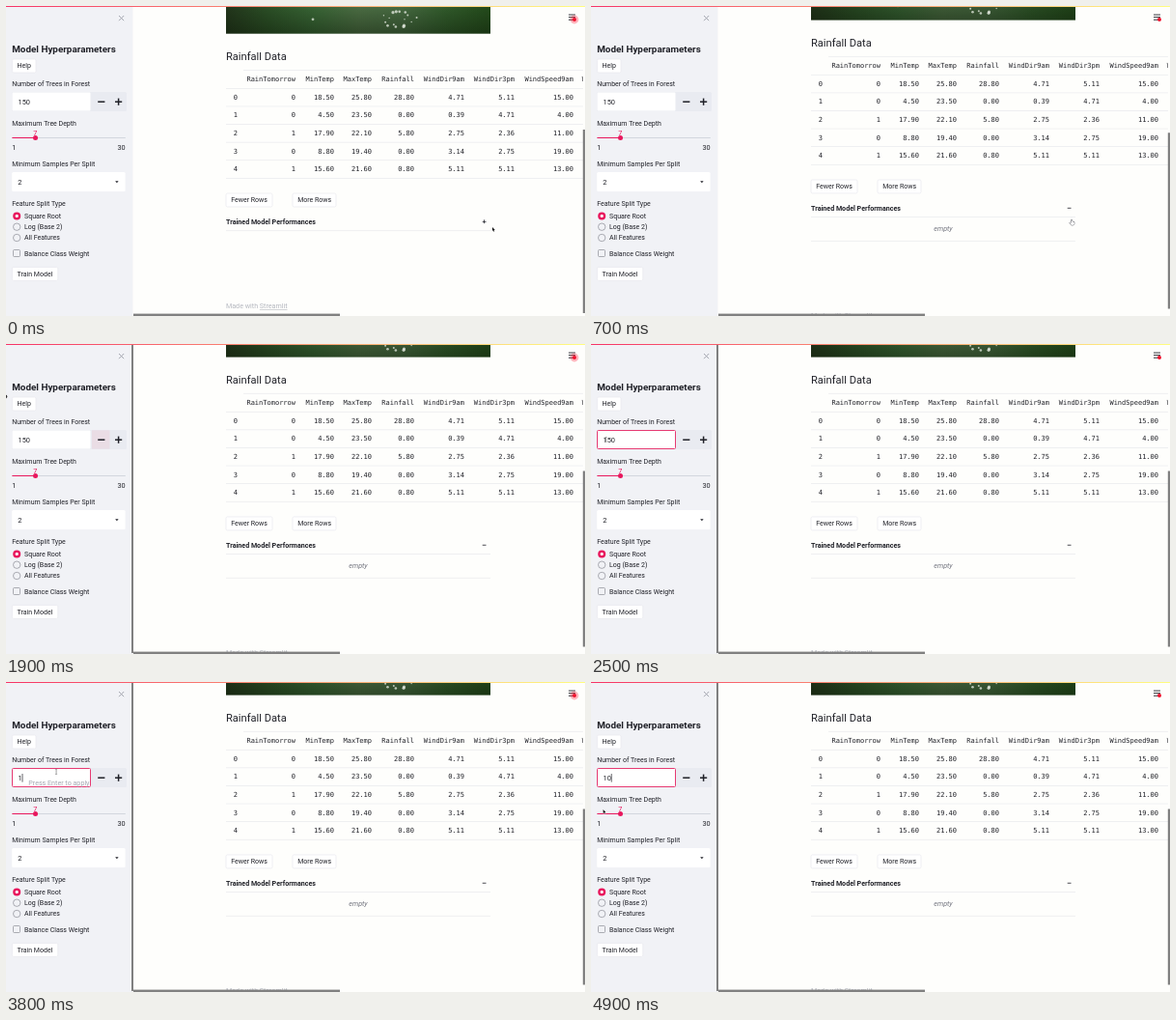
Recreate the animation shown at these times as an HTML page with a canvas. Size 600 by 321 pixels, loop 5 s.

```html
<!DOCTYPE html>
<html lang="en">
<head>
<meta charset="utf-8">
<title>Model dashboard</title>
<style>
html, body { margin: 0; width: 100%; height: 100%; overflow: hidden; background: #fff; }
canvas { display: block; width: 600px; height: 321px; }
</style>
</head>
<body>
<canvas id="stage"></canvas>
<script>
const W = 600, H = 321, LOOP = 5000, STEP = 100;
const SANS = 'Roboto, "Open Sans", sans-serif';
const MONO = '"DejaVu Sans Mono", "Liberation Mono", monospace';
const INK = '#202128', PINK = '#e8175d', SIDE = '#f1f2f6', RULE = '#e9eaed', BAR = '#808080';

const canvas = document.getElementById('stage');
const ctx = canvas.getContext('2d');
const ratio = window.devicePixelRatio || 1;
canvas.width = W * ratio;
canvas.height = H * ratio;

const clamp = v => Math.max(0, Math.min(1, v));
const lerp = (a, b, p) => a + (b - a) * p;
const ease = (t, from, to) => {
  const p = clamp((t - from) / (to - from));
  return p * p * (3 - 2 * p);
};

// y is the middle of the capital letters
function text(s, x, y, { size = 7, color = INK, align = 'left', font = SANS, style = '' } = {}) {
  ctx.font = `${style} ${size}px ${font}`;
  ctx.textAlign = align;
  ctx.fillStyle = color;
  ctx.fillText(s, x, y + size * 0.355);
}

function rect(x, y, w, h, color) {
  ctx.fillStyle = color;
  ctx.fillRect(x, y, w, h);
}

function box(x, y, w, h, fill, stroke, r = 1.5, line = 0.7) {
  ctx.beginPath();
  ctx.roundRect(x, y, w, h, r);
  if (fill) { ctx.fillStyle = fill; ctx.fill(); }
  if (stroke) { ctx.strokeStyle = stroke; ctx.lineWidth = line; ctx.stroke(); }
}

function disc(x, y, r, fill, stroke, line = 0.7) {
  ctx.beginPath();
  ctx.arc(x, y, r, 0, Math.PI * 2);
  if (fill) { ctx.fillStyle = fill; ctx.fill(); }
  if (stroke) { ctx.strokeStyle = stroke; ctx.lineWidth = line; ctx.stroke(); }
}

function poly(points, fill, stroke, line = 0.6) {
  ctx.beginPath();
  points.forEach(([x, y]) => ctx.lineTo(x, y));
  ctx.closePath();
  if (stroke) { ctx.strokeStyle = stroke; ctx.lineWidth = line; ctx.stroke(); }
  ctx.fillStyle = fill;
  ctx.fill();
}

function sign(x, y, arm, line, plus, color = INK) {
  rect(x - arm, y - line / 2, arm * 2, line, color);
  if (plus) rect(x - line / 2, y - arm, line, arm * 2, color);
}

function button(label, x, y, w) {
  box(x, y - 7, w, 14, '#fff', '#e8e9ee');
  text(label, x + 5.2, y);
}

function clip(x, y, w, h) {
  ctx.save();
  ctx.beginPath();
  ctx.rect(x, y, w, h);
  ctx.clip();
}

function drawPhoto(bottom) {
  clip(228, 0, 274, bottom);
  const g = ctx.createLinearGradient(228, 0, 502, 0);
  ['#22351b', '#2b4f26', '#376334', '#4a6b42', '#456840', '#30592a', '#234a1b']
    .forEach((c, i) => g.addColorStop(i / 6, c));
  rect(228, 0, 274, bottom, g);
  const shade = ctx.createLinearGradient(0, bottom - 28, 0, bottom);
  shade.addColorStop(0, 'rgba(10,20,5,0)');
  shade.addColorStop(1, 'rgba(10,20,5,.4)');
  rect(228, 0, 274, bottom, shade);
  // droplets hang together in a loose arc
  for (let i = 0; i < 16; i++) {
    const a = i * 2.4, x = 407 + Math.cos(a) * (6 + i), y = bottom - 15 + Math.sin(a) * 8;
    disc(x, y, 0.7 + (i % 4) * 0.3, 'rgba(232,238,228,.75)');
  }
  disc(318, bottom - 15, 1.4, 'rgba(232,238,228,.7)');
  ctx.restore();
}

const COLS = [
  ['RainTomorrow', 300, '0 0 1 0 1'],
  ['MinTemp', 340, '18.50 4.50 17.90 8.80 15.60'],
  ['MaxTemp', 379, '25.80 23.50 22.10 19.40 21.60'],
  ['Rainfall', 423, '28.80 0.00 5.80 0.00 0.80'],
  ['WindDir9am', 475, '4.71 0.39 2.75 3.14 5.11'],
  ['WindDir3pm', 527, '5.11 4.71 2.36 2.75 5.11'],
  ['WindSpeed9am', 588, '15.00 4.00 11.00 19.00 13.00']
];

function drawTable(dy) {
  const right = { font: MONO, align: 'right' };
  const rowY = i => 94.4 + i * 18.6 + dy;
  clip(228, 0, 370, H);
  rect(246, 66 + dy, 352, 0.7, RULE);
  for (let i = 0; i <= 5; i++) rect(228, rowY(i) - 9.4, 370, 0.7, RULE);
  for (let i = 0; i < 5; i++) text(String(i), 240, rowY(i), right);
  for (const [name, x, values] of COLS) {
    text(name, x, 75.7 + dy, right);
    values.split(' ').forEach((v, i) => text(v, x, rowY(i), right));
  }
  text('W', 596.8, 75.7 + dy, { font: MONO });
  ctx.restore();
}

function drawMain(t) {
  const scroll = ease(t, 305, 775);
  const dy = -15.1 * scroll;
  const open = ease(t, 250, 700);
  const hover = t >= 200 && t < 650;
  const tone = hover ? PINK : INK;
  const y = 223.6 + dy;

  drawPhoto(28.8 + dy);
  text('Rainfall Data', 228, 52.5 + dy, { size: 11.1 });
  drawTable(dy);
  button('Fewer Rows', 228, 201 + dy, 48);
  button('More Rows', 297, 201 + dy, 45);

  text('Trained Model Performances', 228, y, { style: hover ? '500' : 'bold', size: 7.1, color: tone });
  sign(495.6, y - 0.3, 1.9, 0.8, open < 0.2, tone);
  rect(228, y + 8.8, 274, 0.7, hover ? PINK : RULE);
  if (open > 0.1) {
    text('empty', 365, y + 8.5 + 12.6 * open,
      { style: 'italic', size: 7.2, align: 'center', color: hover ? INK : '#747680' });
    if (open > 0.8) rect(228, y + 33.4 * open, 274, 0.7, RULE);
  }

  const footY = 310.6 + dy + 24 * open;
  const pale = { color: '#b4b7bf', size: 7.15 };
  text('Made with ', 228, footY, pale);
  const linkX = 228 + ctx.measureText('Made with ').width;
  text('Streamlit', linkX, footY, pale);
  rect(linkX, footY + 3.4, ctx.measureText('Streamlit').width, 0.6, pale.color);

  rect(132, 318.6, 214, 2.4, BAR);
  const top = lerp(128, 131.5, scroll);
  rect(597.8, top, 2.2, lerp(318, 313.5, open) - top, BAR);
}

function drawMenu(t) {
  for (let i = 0; i < 3; i++) rect(583, 8.6 + i * 2.6, 7, 0.9, INK);
  const glow = Math.max(0, Math.cos(t / 950 * Math.PI * 2)) ** 3;
  disc(589, 14, 2 + 2.4 * glow, `rgba(255,43,70,${0.35 * glow})`);
  disc(589, 14, 2, '#f0142f');
}

function drawInput(t) {
  const focus = t >= 2500;
  const key = t >= 4400 ? 4400 : t >= 4100 ? 4100 : 3500;
  const value = t >= 4100 ? '10' : t >= 3500 ? '1' : '150';

  box(6, 89, 119, 20, '#e9ebf1', null);
  if (t >= 1700 && t < 2100) rect(89, 89.3, 18.5, 19.4, '#eadde5');
  box(6.5, 89.5, 81, 19, '#fff', focus ? '#e63a72' : null, 1, 1);
  if (t >= 2700 && t < 3500) rect(12.3, 94.3, 13.2, 9.4, '#c3c3c6');
  text(value, 12.5, 99.4, { size: 7.4 });
  if (t >= 3500) {
    const end = 12.5 + ctx.measureText(value).width;
    if ((t - key) % 1000 < 530) rect(end, 95, 0.7, 8.6, INK);
    if (t < 4400) text('Press Enter to apply', 86.5, 104.6, { size: 7.15, color: '#a5a8b2', align: 'right' });
  }
  sign(98.8, 99.2, 3.6, 1.5, false);
  sign(116.6, 99.2, 3.6, 1.5, true);
}

function drawSidebar(t) {
  rect(0, 0, 131.5, H, SIDE);
  if (t >= 1600) rect(130, 0, 2, 320, BAR);

  ctx.beginPath();
  ctx.moveTo(117, 10); ctx.lineTo(122.2, 15.2);
  ctx.moveTo(122.2, 10); ctx.lineTo(117, 15.2);
  ctx.strokeStyle = '#a3a6af';
  ctx.lineWidth = 1;
  ctx.stroke();

  text('Model Hyperparameters', 6.2, 44.4, { size: 9.9, style: 'bold' });
  button('Help', 6.4, 62, 24.6);
  text('Number of Trees in Forest', 6.2, 81);
  drawInput(t);

  text('Maximum Tree Depth', 6.2, 121.3);
  rect(6.4, 136, 117.4, 1, '#d3d6de');
  rect(6.4, 136, 24, 1, PINK);
  disc(30.5, 136.5, 2.5, PINK);
  text('7', 30.3, 131.2, { size: 7.3, color: PINK, align: 'center' });
  text('1', 6.2, 146.3, { size: 7.3 });
  text('30', 123.6, 146.3, { size: 7.3, align: 'right' });

  text('Minimum Samples Per Split', 6.2, 163.3);
  box(6.2, 172, 117.4, 20, '#fff', null);
  text('2', 12.3, 182.2, { size: 7.4 });
  poly([[113.2, 181.3], [116.6, 181.3], [114.9, 183.2]], INK);

  text('Feature Split Type', 6.2, 204.2);
  ['Square Root', 'Log (Base 2)', 'All Features'].forEach((label, i) => {
    const y = 217.4 + i * 11.3;
    if (i) disc(11.2, y, 3.7, SIDE, '#8b8d96');
    else { disc(11.2, y, 4, PINK); disc(11.2, y, 1.6, '#fff'); }
    text(label, 19, y);
  });
  box(7.5, 252.5, 7, 7, SIDE, '#8b8d96', 1);
  text('Balance Class Weight', 19, 256.2);
  button('Train Model', 6.4, 277.4, 47.4);
}

// time, x, y
const PATH = [
  [0, 504, 229], [200, 498, 221], [400, 497.5, 220.5], [700, 498, 221.5],
  [1300, 498, 221.5], [1700, 100, 98], [1900, -1, 51.5], [2300, 20, 98],
  [2600, 14, 99], [2900, 52, 93], [4400, 52, 93], [4800, 22, 119], [4900, 12.6, 132]
];

function pointer(t) {
  const i = PATH.findIndex(p => p[0] > t);
  if (i < 0) return PATH[PATH.length - 1].slice(1);
  const [t0, x0, y0] = PATH[i - 1], [t1, x1, y1] = PATH[i];
  const p = ease(t, t0, t1);
  return [lerp(x0, x1, p), lerp(y0, y1, p)];
}

function drawPointer(t) {
  const [x, y] = pointer(t);
  ctx.save();
  ctx.translate(x, y);
  if (t >= 200 && t < 1400) {
    poly([[-0.4, 0], [0.6, 0], [0.8, 1.8], [2.8, 2.2], [2.7, 4.2], [1.9, 5.3],
      [-0.4, 5.3], [-2, 3.2], [-1.5, 2.7], [-0.4, 3.3]], '#fff', '#44464e', 0.9);
  } else if (t >= 2300 && t < 4600) {
    rect(-0.3, -2.4, 0.7, 4.8, '#777');
    rect(-1.1, -2.7, 2.2, 0.6, '#888');
    rect(-1.1, 2.1, 2.2, 0.6, '#888');
  } else {
    poly([[0, 0], [0, 4], [0.9, 3.2], [1.6, 4.8], [2.2, 4.5], [1.6, 3], [2.8, 2.9]],
      '#111', '#fff', 0.7);
  }
  ctx.restore();
}

function drawTopLine() {
  const g = ctx.createLinearGradient(0, 0, W, 0);
  g.addColorStop(0, '#f63366');
  g.addColorStop(1, '#fffd80');
  rect(0, 0, W, 1, g);
}

function frame(now) {
  const t = Math.floor((now % LOOP) / STEP) * STEP;
  ctx.setTransform(ratio, 0, 0, ratio, 0, 0);
  rect(0, 0, W, H, '#fefefc');
  drawMain(t);
  drawSidebar(t);
  drawTopLine();
  drawMenu(t);
  drawPointer(t);
}

const start = performance.now();
function tick() {
  frame(performance.now() - start);
  requestAnimationFrame(tick);
}
tick();
</script>
</body>
</html>
```
